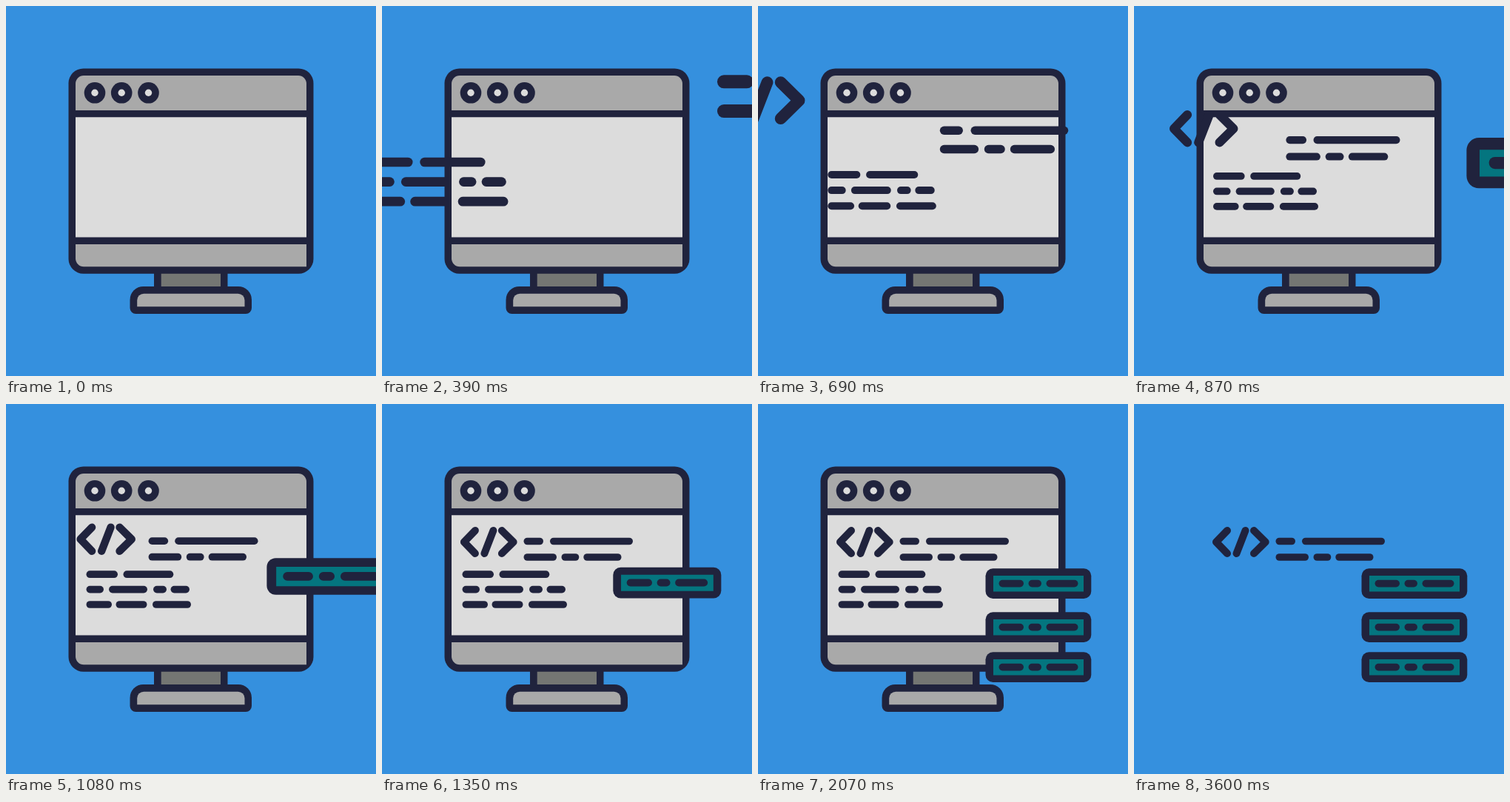
An HTML page with a canvas that plays this animation: 500 by 500 pixels, repeating every 3.63 s.

```html
<!DOCTYPE html>
<html lang="en">
<head>
<meta charset="utf-8">
<title>Code window</title>
<style>
html, body { margin: 0; width: 100%; height: 100%; overflow: hidden; background: #3590de; }
canvas { display: block; width: 100vw; height: 100vh; }
</style>
</head>
<body>
<canvas id="stage" width="500" height="500"></canvas>
<script>
const ctx = document.getElementById('stage').getContext('2d');
const LOOP = 3630, STEP = 30, MONITOR_OFF = 3600;
const BLUE = '#3590de', NAVY = '#20233d', GREY = '#a9a9a9',
      LIGHT = '#dcdcdc', NECK = '#747673', TEAL = '#04757f';

// Filled box from edges, with optional corner radii
function box(color, x1, y1, x2, y2, radii = 0) {
  ctx.fillStyle = color;
  ctx.beginPath();
  ctx.roundRect(x1, y1, x2 - x1, y2 - y1, radii);
  ctx.fill();
}

function disc(color, x, y, r) {
  ctx.fillStyle = color;
  ctx.beginPath();
  ctx.arc(x, y, r, 0, Math.PI * 2);
  ctx.fill();
}

// Row of pills: pairs of left and right edges
function dashes(y, ...edges) {
  for (let i = 0; i < edges.length; i += 2)
    box(NAVY, edges[i], y - 4.85, edges[i + 1], y + 4.85, 4.85);
}

function stroke(...points) {
  ctx.beginPath();
  for (let i = 0; i < points.length; i += 2) ctx.lineTo(points[i], points[i + 1]);
  ctx.stroke();
}

function monitor() {
  box(NAVY, 200, 358, 299.5, 384);
  box(NECK, 209.7, 358, 290, 380);
  box(NAVY, 167.5, 379, 332, 416, [18, 18, 8, 8]);
  box(GREY, 177.2, 388.7, 322.5, 406.3, [9, 9, 0, 0]);
  box(NAVY, 84.5, 84.5, 415.5, 361.7, 20);
  box(GREY, 94, 94, 406, 141, [11, 11, 0, 0]);
  box(LIGHT, 94, 150.2, 406, 312.6);
  box(GREY, 94, 322, 406, 352.3, [0, 0, 0, 11]);
  for (const x of [120, 156.2, 192.5]) {
    disc(NAVY, x, 117.3, 14.3);
    disc(LIGHT, x, 117.3, 4.7);
  }
}

function leftLines() {
  dashes(230.2, 108.5, 151, 158.5, 226.3);
  dashes(250.6, 108.5, 132, 139, 191, 199, 217, 222.5, 248);
  dashes(271, 108.5, 143, 148.5, 190.5, 198, 250);
}

function topLines() {
  dashes(185.5, 191.5, 218, 227, 339);
  dashes(207, 191.5, 236, 242.5, 266.3, 272.3, 323.5);
}

function codeTag() {
  ctx.strokeStyle = NAVY;
  ctx.lineWidth = 10;
  ctx.lineCap = ctx.lineJoin = 'round';
  stroke(126, 171, 111, 186.5, 126, 202);
  stroke(150.5, 171, 138.5, 202);
  stroke(162, 171, 177.7, 186.5, 162, 202);
}

function card(dy) {
  box(NAVY, 307.5, 222.3 + dy, 450.3, 263 + dy, 10);
  box(TEAL, 318, 232 + dy, 440, 253.6 + dy);
  dashes(242.6 + dy, 325.5, 359, 365.5, 383, 389.5, 432.5);
}

function easeInOut(p) {
  p = Math.min(1, Math.max(0, p));
  return p < 0.5 ? 4 * p ** 3 : 1 - 4 * (1 - p) ** 3;
}

function cards(t) {
  if (t > 1530) card(113 * easeInOut((t - 1530) / 540));
  if (t > 1440) card(59 * easeInOut((t - 1440) / 540));
  card(0);
}

// Each part shrinks into place around its anchor; rate sets the quartic ease-out
const parts = [
  { draw: leftLines, end: 1110, rate: 0.00103, x: 179, y: 250.6, dx: -334, dy: -43, off: MONITOR_OFF },
  { draw: topLines, end: 1313, rate: 0.00104, x: 191.5, y: 185.5, dx: 308, dy: -98, off: LOOP },
  { draw: codeTag, end: 1477, rate: 0.00111, x: 144.5, y: 186.5, dx: -243, dy: -101, off: LOOP },
  { draw: cards, end: 1710, rate: 0.00108, x: 379, y: 242.6, dx: 281, dy: -45, off: LOOP }
];

function flyIn(part, t) {
  const k = (Math.max(0, part.end - t) * part.rate) ** 4;
  ctx.save();
  ctx.translate(part.x + part.dx * k, part.y + part.dy * k);
  ctx.scale(1 + k, 1 + k);
  ctx.translate(-part.x, -part.y);
  part.draw(t);
  ctx.restore();
}

function render(t) {
  box(BLUE, 0, 0, 500, 500);
  if (t < MONITOR_OFF) monitor();
  if (t < 150) return;
  for (const part of parts) if (t < part.off) flyIn(part, t);
}

const start = performance.now();
function tick() {
  const t = (performance.now() - start) % LOOP;
  render(Math.floor(t / STEP) * STEP);
  requestAnimationFrame(tick);
}
tick();
</script>
</body>
</html>
```
